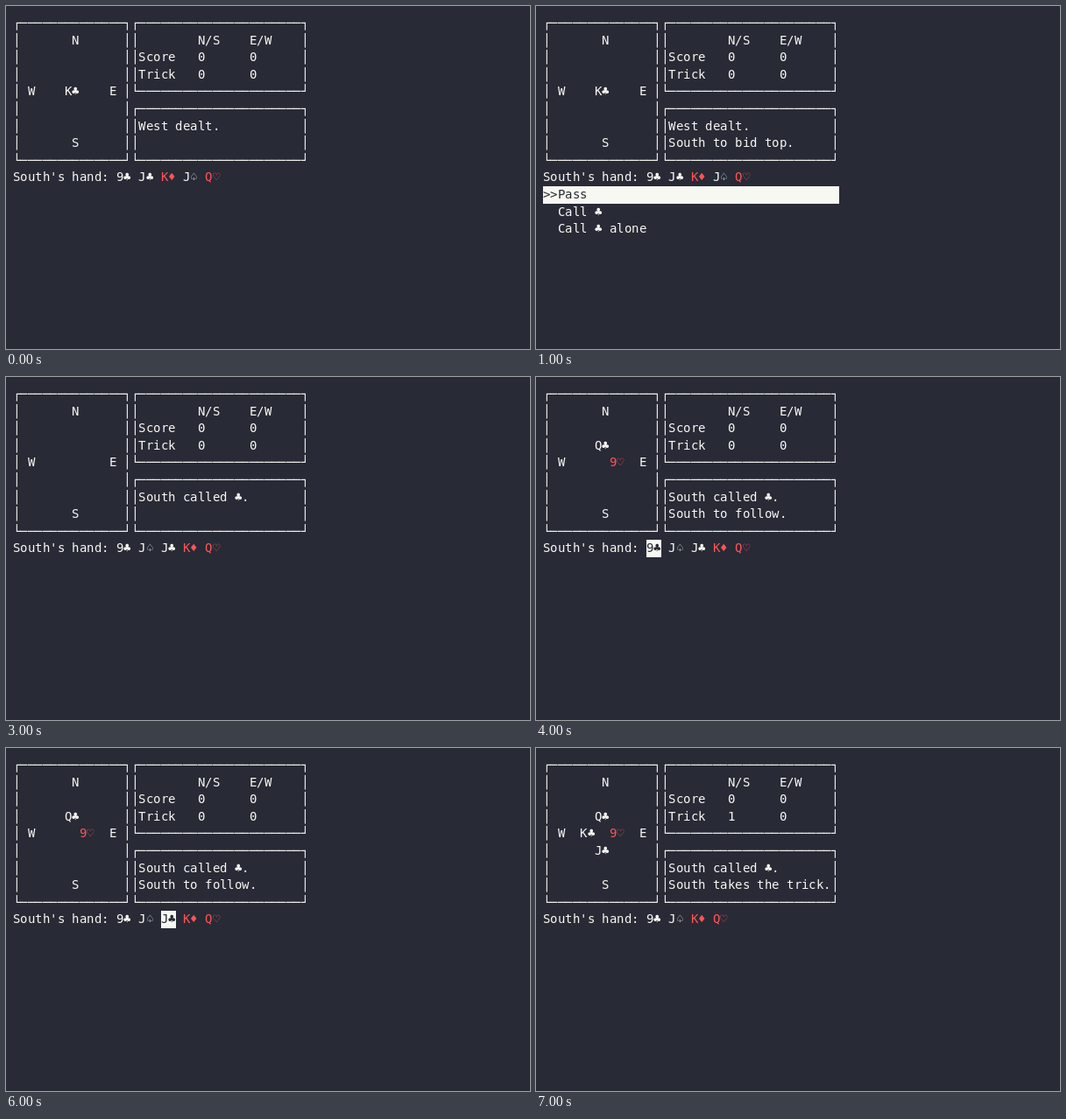
Recreate the animation shown at these times as an HTML page with a canvas. Size 598 by 392 pixels, loop 8 s.

```html
<!DOCTYPE html>
<html lang="en">
<head>
<meta charset="utf-8">
<title>Card game in a terminal</title>
<style>
  html, body { margin: 0; width: 100%; height: 100%; overflow: hidden; background: #282a36; }
  canvas { display: block; }
</style>
</head>
<body>
<canvas id="stage" width="598" height="392"></canvas>
<script>
const ctx = document.getElementById('stage').getContext('2d');
const BACK = '#282a36', FORE = '#f8f8f2', RED = '#ff5555';
const COL = 8.4277, ROW = 19.6, LOOP = 8000, STEP = 1000;

const cellX = col => Math.round(8 + col * COL);
const cellY = row => Math.round(10 + row * ROW);

function put(row, col, text, color = FORE) {
  ctx.fillStyle = color;
  const baseline = Math.round(24 + row * ROW);
  [...text].forEach((ch, i) => {
    if (ch !== ' ') ctx.fillText(ch, cellX(col + i), baseline);
  });
}

function putInverse(row, col, text) {
  const x = cellX(col), y = cellY(row);
  ctx.fillStyle = FORE;
  ctx.fillRect(x, y, cellX(col + text.length - 1) + 9 - x, cellY(row + 1) - y);
  put(row, col, text, BACK);
}

function card(row, col, name, selected) {
  if (selected) putInverse(row, col, name);
  else put(row, col, name, /[♦♡]/.test(name) ? RED : FORE);
}

function box(top, bottom, left, right) {
  const line = '─'.repeat(right - left - 1);
  put(top, left, '┌' + line + '┐');
  for (let row = top + 1; row < bottom; row++) {
    put(row, left, '│');
    put(row, right, '│');
  }
  put(bottom, left, '└' + line + '┘');
}

const dealt = ['9♣', 'J♣', 'K♦', 'J♤', 'Q♡'];
const sorted = ['9♣', 'J♤', 'J♣', 'K♦', 'Q♡'];
const menu = ['Pass', 'Call ♣', 'Call ♣ alone'];

// Table cards are [row, column, name].
const turned = [[4, 7, 'K♣']];
const played = [[3, 7, 'Q♣'], [4, 9, '9♡']];
const fullTrick = [...played, [4, 5, 'K♣'], [5, 7, 'J♣']];

const bid = { table: turned, hand: dealt, log: ['West dealt.', 'South to bid top.'] };
const follow = { table: played, hand: sorted, log: ['South called ♣.', 'South to follow.'] };

const scenes = [
  { ...bid, log: ['West dealt.'] },
  { ...bid, choice: 0 },
  { ...bid, choice: 1 },
  { table: [], hand: sorted, log: ['South called ♣.'] },
  { ...follow, picked: 0 },
  { ...follow, picked: 1 },
  { ...follow, picked: 2 },
  {
    table: fullTrick,
    hand: sorted.filter(name => name !== 'J♣'),
    log: ['South called ♣.', 'South takes the trick.'],
    tricks: 1
  }
];

function draw({ table, hand, log, choice, picked, tricks = 0 }) {
  ctx.fillStyle = BACK;
  ctx.fillRect(0, 0, 598, 392);
  ctx.font = '14px "DejaVu Sans Mono", monospace';
  ctx.textBaseline = 'alphabetic';

  box(0, 8, 0, 15);
  box(0, 4, 16, 39);
  box(5, 8, 16, 39);

  put(1, 8, 'N');
  put(4, 2, 'W');
  put(4, 13, 'E');
  put(7, 8, 'S');
  table.forEach(([row, col, name]) => card(row, col, name));

  put(1, 25, 'N/S    E/W');
  put(2, 17, 'Score   0      0');
  put(3, 17, `Trick   ${tricks}      0`);
  log.forEach((text, i) => put(6 + i, 17, text));

  put(9, 0, "South's hand:");
  hand.forEach((name, i) => card(9, 14 + 3 * i, name, i === picked));

  if (choice === undefined) return;
  menu.forEach((label, i) => {
    if (i === choice) putInverse(10 + i, 0, ('>>' + label).padEnd(40));
    else put(10 + i, 2, label);
  });
}

function tick() {
  draw(scenes[Math.floor((performance.now() % LOOP) / STEP)]);
  requestAnimationFrame(tick);
}
tick();
</script>
</body>
</html>
```
